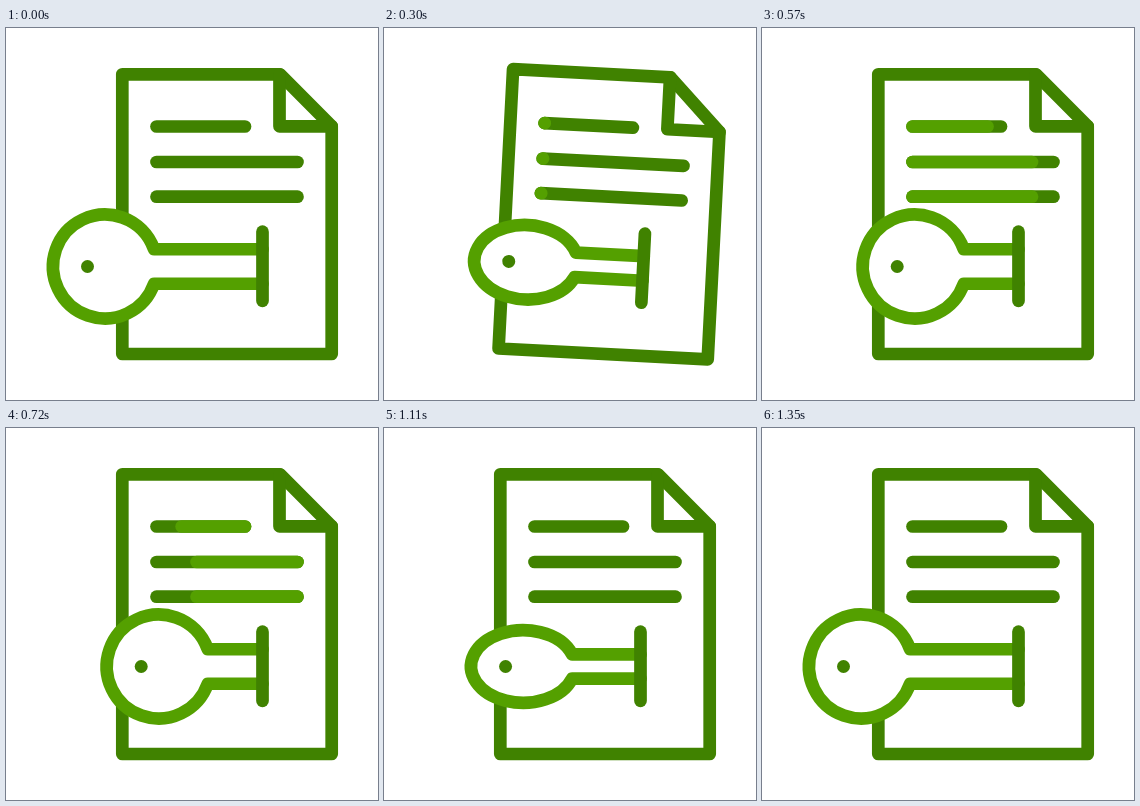
An HTML page with a canvas for the animation above (1.5 s loop, 372 px wide and 372 px high).

```html
<!DOCTYPE html>
<html lang="en">
<head>
<meta charset="utf-8">
<title>Document key</title>
<style>
  html, body { margin: 0; width: 100%; height: 100%; overflow: hidden; background: #fff; }
  canvas { display: block; }
</style>
</head>
<body>
<canvas id="stage" width="372" height="372"></canvas>
<script>
const ctx = document.getElementById('stage').getContext('2d');
const LOOP = 1500, DARK = '#408200', LIGHT = '#54a000';
const AXIS = 238.5, HEAD = 52, NECK = 0.338, TRAVEL = 53.7;
const TEXT_LEFT = 150.5;
const TEXT_LINES = [[98.5, 239], [134, 291.5], [168.7, 291.5]];

// Sine ease-in-out progress between two times
const ease = (t, from, to) => {
  const p = Math.min(1, Math.max(0, (t - from) / (to - from)));
  return (1 - Math.cos(Math.PI * p)) / 2;
};

function stroke(color, ...points) {
  ctx.strokeStyle = color;
  ctx.beginPath();
  points.forEach(([x, y]) => ctx.lineTo(x, y));
  ctx.stroke();
}

function drawPage() {
  stroke(DARK, [116.3, 46.3], [274, 46.3], [325.7, 98.3], [325.7, 326], [116.3, 326], [116.3, 46.3], [274, 46.3]);
  stroke(DARK, [273.5, 46.3], [273.5, 98.3], [325.7, 98.3]);
}

function drawText(t) {
  const head = ease(t, 288, 668), tail = ease(t, 585, 965);
  for (const [y, right] of TEXT_LINES) {
    const at = p => [TEXT_LEFT + (right - TEXT_LEFT) * p, y];
    stroke(DARK, at(0), at(1));
    if (t > 288 && t < 980) stroke(LIGHT, at(tail), at(head));
  }
}

function drawKey(t) {
  // The key makes half a turn about its axis while sliding in, and again on the way out
  const slide = ease(t, 60, 420) - ease(t, 990, 1350);
  const flat = Math.abs(Math.cos(Math.PI * slide));
  const shift = TRAVEL * slide;
  const half = HEAD * Math.sin(NECK) * flat;

  ctx.fillStyle = '#fff';
  ctx.strokeStyle = LIGHT;
  ctx.beginPath();
  ctx.moveTo(256.5, AXIS + half);
  ctx.ellipse(99 + shift, AXIS, HEAD, HEAD * flat, 0, NECK, 2 * Math.PI - NECK);
  ctx.lineTo(256.5, AXIS - half);
  ctx.fill();
  ctx.stroke();

  ctx.fillStyle = DARK;
  ctx.beginPath();
  ctx.arc(81.5 + shift, AXIS, 6.5, 0, 2 * Math.PI);
  ctx.fill();
  stroke(DARK, [256.5, 203.7], [256.5, 272.8]);
}

function draw() {
  const t = performance.now() % LOOP;
  const tilt = 4 * (ease(t, 60, 240) - ease(t, 240, 420)) * Math.PI / 180;

  ctx.setTransform(1, 0, 0, 1, 0, 0);
  ctx.fillStyle = '#fff';
  ctx.fillRect(0, 0, 372, 372);
  ctx.translate(221, 290);
  ctx.rotate(tilt);
  ctx.translate(-221, -290);
  ctx.lineWidth = 12.7;
  ctx.lineCap = ctx.lineJoin = 'round';

  drawPage();
  drawText(t);
  drawKey(t);
  requestAnimationFrame(draw);
}
draw();
</script>
</body>
</html>
```
